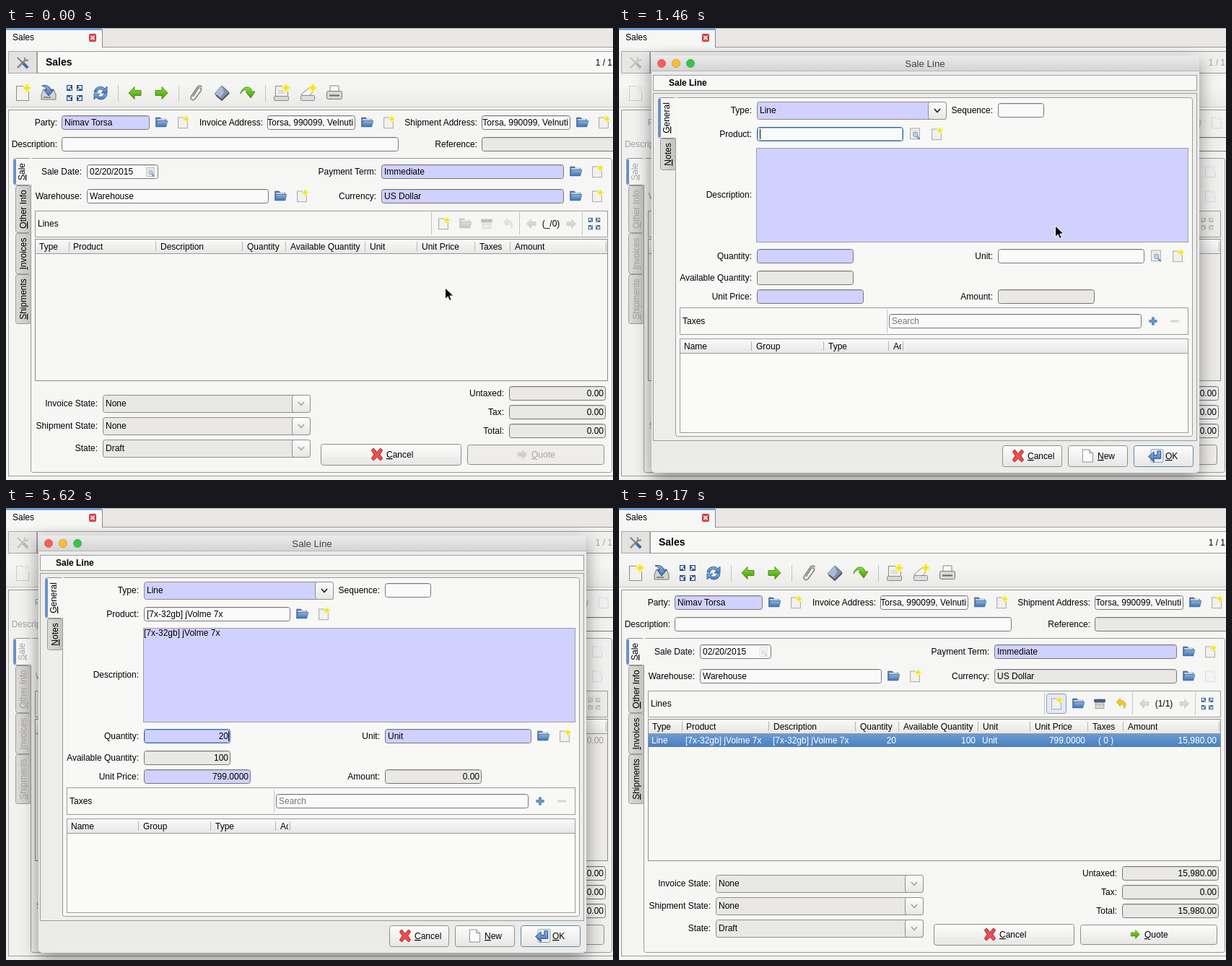
Write an HTML page that moves like this. It is 841 px wide and 626 px high and loops after 9.27 s.

```html
<!DOCTYPE html>
<html lang="en">
<head>
<meta charset="utf-8">
<title>Sales order entry</title>
<style>
html, body { margin: 0; width: 100%; height: 100%; overflow: hidden; background: #f5f5f4; }
svg { display: block; }
text { font-family: "Liberation Sans", Arial, Helvetica, sans-serif; white-space: pre; }
.u { text-decoration: underline; }
.off { filter: grayscale(1) opacity(.36); }
.shadow { filter: drop-shadow(0 9px 12px rgba(0,0,0,.42)); }
</style>
</head>
<body>
<svg id="stage" width="841" height="626" viewBox="0 0 841 626">
  <defs>
    <linearGradient id="btn" x2="0" y2="1"><stop stop-color="#fdfdfd"/><stop offset="1" stop-color="#e7e6e4"/></linearGradient>
    <linearGradient id="head" x2="0" y2="1"><stop stop-color="#fafafa"/><stop offset="1" stop-color="#e8e7e5"/></linearGradient>
    <linearGradient id="bar" x2="0" y2="1"><stop offset=".3" stop-color="#f5f5f4"/><stop offset="1" stop-color="#ebeae8"/></linearGradient>
    <linearGradient id="title" x2="0" y2="1"><stop stop-color="#ebebeb"/><stop offset="1" stop-color="#d3d3d3"/></linearGradient>
    <linearGradient id="tab"><stop stop-color="#dcdbd9"/><stop offset="1" stop-color="#c3c2c0"/></linearGradient>
    <linearGradient id="pick" x2="0" y2="1"><stop stop-color="#6a9bd3"/><stop offset="1" stop-color="#4a80c0"/></linearGradient>
    <linearGradient id="blue" x2="0" y2="1"><stop stop-color="#8db4e2"/><stop offset="1" stop-color="#3f73b0"/></linearGradient>
    <linearGradient id="green" x2="0" y2="1"><stop stop-color="#8ae234"/><stop offset="1" stop-color="#3f9a06"/></linearGradient>
  </defs>
  <g id="scene"></g>
</svg>
<script>
const LOOP = 9270;
const ITEM = '[7x-32gb] jVolme 7x';
const LILAC = '#d1d1ff', READ = '#e9e8e6', EDGE = '#777', LINE = '#9b9b99', FOCUS = '#3a6ea5';

// Each step changes some values and keeps the rest.
const STEPS = [
  [0, { x: 609, y: 361, cur: 'arrow', on: 1, dlg: 0, row: 0, hot: 0, total: 0, hover: 0, item: 0, focus: 'product', qty: '', locked: 0 }],
  [210, { x: 608, y: 341 }],
  [420, { x: 607, y: 304 }],
  [620, { x: 605, y: 280, hot: 1 }],
  [830, { y: 275 }],
  [1040, { hot: 2 }],
  [1250, { dlg: 1 }],
  [1460, { dlg: 2, on: 0, hot: 0 }],
  [1670, { x: 520, y: 215 }],
  [1870, { x: 436, y: 163 }],
  [2080, { x: 413, y: 150, hover: 1 }],
  [2290, { hover: 2 }],
  [2490, { hover: 1 }],
  [2700, { item: 1, row: 1, hover: 0 }],
  [2910, { x: 398, y: 172, cur: 'beam' }],
  [3120, { x: 350, y: 222 }],
  [3330, { x: 312, y: 256 }],
  [3530, { x: 302, y: 267 }],
  [3740, { x: 301, y: 282 }],
  [3950, { x: 300, y: 304 }],
  [4160, { x: 299, y: 315 }],
  [4370, { focus: 'qty' }],
  [4580, { x: 299, y: 317 }],
  [5210, { qty: '2', cur: '' }],
  [5420, { qty: '20' }],
  [6870, { dlg: 0, cur: 'arrow', x: 299, y: 315 }],
  [7290, { on: 1, row: 2, locked: 1, hot: 1 }],
  [7500, { total: 1 }],
  [7700, { x: 352, y: 328 }],
  [7910, { x: 448, y: 330 }],
  [8120, { x: 462, y: 322 }],
  [8540, { x: 618, y: 428 }],
  [8750, { x: 737, y: 552 }],
  [8960, { x: 815, y: 608 }],
  [9170, { cur: '' }]
];
const states = [];
STEPS.forEach(([, change], i) => states.push({ ...states[i - 1], ...change }));

const box = (x, y, w, h, fill, stroke = 'none', rx = 0) =>
  `<rect x="${x + .5}" y="${y + .5}" width="${w - 1}" height="${h - 1}" rx="${rx}" fill="${fill}" stroke="${stroke}"/>`;
const fillBox = (x, y, w, h, fill) => `<rect x="${x}" y="${y}" width="${w}" height="${h}" fill="${fill}"/>`;
const path = (d, fill = 'none', stroke = 'none', w = 1) =>
  `<path d="${d}" fill="${fill}" stroke="${stroke}" stroke-width="${w}"/>`;
const vline = (x, y1, y2, c = '#c4c4c2') => path(`M${x + .5} ${y1}V${y2}`, 'none', c);
const hline = (x1, x2, y, c = LINE) => path(`M${x1} ${y + .5}H${x2}`, 'none', c);
const dot = (x, y, r, fill, stroke = 'none') => `<circle cx="${x}" cy="${y}" r="${r}" fill="${fill}" stroke="${stroke}"/>`;

// A "~" underlines the letter that follows it.
function text(x, y, s, { a = 'start', c = '#000', z = 12, b = 0, r = 0 } = {}) {
  const body = s.replace(/~(.)/, '<tspan class="u">$1</tspan>');
  const turn = r ? ` transform="rotate(-90 ${x} ${y})"` : '';
  return `<text x="${x}" y="${y}" text-anchor="${a}" fill="${c}" font-size="${z}"${b ? ' font-weight="700"' : ''}${turn}>${body}</text>`;
}
const label = (x, y, s, c) => text(x, y, s, { a: 'end', c });

function field(x, y, w, fill, s = '', right = 0, edge = EDGE) {
  const clip = `<svg x="${x + 1}" y="${y}" width="${w - 2}" height="20">` +
    text(right ? w - 4 : 3, 14, s, { a: right ? 'end' : 'start' }) + '</svg>';
  return box(x, y, w, 20, fill, edge, 3) + hline(x + 3, x + w - 3, y + 1, 'rgba(0,0,0,.1)') + clip;
}

const page = `<rect x="-8.5" y="-9.5" width="17" height="20" fill="#f1f1ef" stroke="#8c8c88"/>`;
const star = dot(6, -7, 5.5, '#fbf6a0') + path('M6 -13l1.7 4.2 4.3 1.8-4.3 1.8-1.7 4.2-1.7-4.2-4.3-1.8 4.3-1.8z', '#f3e320');
const arrowR = 'M-8 -3.5H1V-8.5L9 0L1 8.5V3.5H-8Z';
const printer = path('M-6 -1V-10H6V-1', '#fafafa', '#888') +
  `<rect x="-10.5" y="-2.5" width="21" height="11" rx="2" fill="#d8d8d4" stroke="#777"/>` + path('M-7 3.5H7', 'none', '#666', 2);
const ICONS = {
  page,
  blank: path('M-7 -9H3L8 -4V9H-7Z', '#fbfbfb', '#8c8c88') + path('M3 -9V-4H8', '#ddd', '#8c8c88'),
  make: page + star,
  save: path('M-10 2L-7 -5H7L10 2V9H-10Z', '#d3d3cf', '#777') + path('M-7 6H3', 'none', '#888', 2) +
    path('M-9 -10C-2 -12 3 -8 3 -4H7L0 4L-6 -4H-3C-3 -7 -5 -9 -9 -10Z', 'url(#blue)', '#204a87'),
  full: [[-1, -1], [1, -1], [-1, 1], [1, 1]].map(([i, j]) =>
    `<g transform="scale(${i} ${j})">` + fillBox(3, 3, 8, 8, '#234f86') + path('M4 4L8.5 8.5M9 5V9H5', 'none', '#fff', 1.5) + '</g>').join(''),
  reload: path('M-9 -1C-8 -9 2 -11 6 -6L9 -9V0H1L4 -3C0 -7 -4 -5 -5 -1Z', 'url(#blue)', '#3465a4') +
    path('M9 1C8 10 -2 11 -6 6L-9 9V1H-1L-4 4C0 7 4 5 5 1Z', 'url(#blue)', '#3465a4'),
  next: path(arrowR, 'url(#green)', '#4a8f1a'),
  back: `<g transform="scale(-1 1)">${path(arrowR, 'url(#green)', '#4a8f1a')}</g>`,
  clip: path('M-4 5L3 -6C5 -9 9 -6 7 -3L-1 8C-4 12 -9 8 -6 4L2 -8C4 -11 8 -10 8 -8', 'none', '#858583', 1.6),
  action: path('M0 -10L10 -1L0 10L-10 1Z', '#7d93b5', '#4b5f80') + path('M-10 1L0 -10L3 -1L-2 6Z', '#adbcd3') + path('M-8 3L0 10L10 0', 'none', '#555', 2),
  jump: path('M-10 1C-8 -10 4 -11 6 -2H10L4 7L-3 -2H1C-1 -6 -7 -5 -10 1Z', 'url(#green)', '#4a8f1a'),
  report: page + star + path('M-5 -3H3M-5 0H4', 'none', '#bbb') + `<rect x="-10.5" y="4.5" width="20" height="6" rx="1" fill="#d8d8d4" stroke="#888"/>`,
  mail: path('M-10 2L3 -9L8 -4L-2 8Z', '#f4f4f2', '#888') + `<rect x="-10.5" y="3.5" width="19" height="7" rx="1" fill="#ddd" stroke="#888"/>` + star,
  print: printer,
  folder: path('M-10 9V-8H-2L0 -5H9V9Z', '#5b7ba3', '#46678f') + path('M-8 -4H8', 'none', '#eee', 2) + path('M-10 9L-7 -2H12L9 9Z', 'url(#blue)', '#4270a6'),
  find: page + path('M-6 -5H5M-6 -2H5', 'none', '#ccc') + dot(1, 2, 4.5, '#b9d3f0', '#5f86b3') + path('M4 6L9 11', 'none', '#777', 2.5),
  trash: path('M-10 -3V-8H10V-3Z', '#3f5f88', '#34506f') + path('M-8 -2H8V9H-8Z', '#d7d7d3', '#888') + path('M-8 2H8', 'none', '#aaa'),
  undo: path('M-9 -3L-2 -10V-6C8 -6 11 3 5 9C6 4 4 1 -2 1V5Z', '#f0c92b', '#c4a000'),
  tools: path('M-8 8L4 -4', 'none', '#8a8d88', 3) + path('M3 -8L4 -3L9 -4', 'none', '#8a8d88', 2.5) + path('M-8 -8L1 1', 'none', '#777', 2) + path('M1 1L8 8', 'none', '#3b6fb0', 4.5),
  cross: path('M-8 -6L-5 -9L0 -3L5 -9L8 -6L4 0L8 6L5 9L0 4L-5 9L-8 6L-4 0Z', '#e8504c', '#a81414'),
  enter: `<rect x="-7.5" y="-9.5" width="18" height="19" rx="2" fill="#eceff3" stroke="#8d9bb0"/>` +
    path('M7 -7V4H-3V9L-11 1L-3 -6V-1H2V-7Z', 'url(#blue)', '#204a87'),
  plus: path('M-2 -7H2V-2H7V2H2V7H-2V2H-7V-2H-2Z', '#6b98d0', '#4374ad'),
  minus: fillBox(-8, -2, 16, 4, '#9a9a98')
};
const icon = (name, x, y, k = 1, off = 0) =>
  `<g transform="translate(${x} ${y}) scale(${k})"${off ? ' class="off"' : ''}>${ICONS[name]}</g>`;
const SMALL = .74;
const small = (name, x, y, off) => icon(name, x, y, SMALL, off);
const pair = (x, y, off, first = 'folder') => small(first, x, y - 1, off) + small('make', x + 30, y, off);

function combo(x, y, w, s, fill, c, split) {
  const m = (split + x + w) / 2, h = y + 12;
  return box(x, y, w, 25, fill, '#8d8d8b', 3) + box(split, y, x + w - split, 25, 'url(#btn)', '#8d8d8b', 3) +
    text(x + 4, y + 16, s) + path(`M${m - 4} ${h - 2}L${m} ${h + 2.5}L${m + 4} ${h - 2}`, 'none', c, 1.7);
}
function button(x, y, w, h, s, tx, name, ix, off = 0, edge = '#8d8d8b') {
  return box(x, y, w, h, off ? '#eeedeb' : 'url(#btn)', edge, 3) + icon(name, ix, y + h / 2 - .5, name === 'next' ? .7 : .95, off) +
    text(tx, y + h / 2 + 4, s, { c: off ? '#a4a4a2' : '#000' });
}
function sideTab(x, y, w, h, s, c, active) {
  return box(x, y, w, h, active ? '#f6f6f5' : 'url(#tab)', active ? '#8f8f8d' : LINE, 3) +
    (active ? fillBox(x + 1, y + 2, 3, h - 4, '#5f93d2') + fillBox(x + w - 2, y + 1, 4, h - 2, '#f6f6f5') : '') +
    text(x + (active ? 16 : 15), y + h / 2, s, { a: 'middle', c, r: 1 });
}
function header(x, y, w, cols, seps, c) {
  return fillBox(x + 1, y + 1, w - 2, 19, 'url(#head)') + hline(x, x + w, y + 20) +
    cols.map(([cx, s]) => text(cx, y + 15, s, { c })).join('') +
    seps.map(sx => vline(sx, y + 4, y + 17, '#b5b5b3')).join('');
}

function mainWindow(s) {
  const off = !s.on, c = off ? '#a2a2a0' : '#000';
  const bg = off ? '#f1f1f0' : '#f5f5f4';
  const plain = off ? '#f0f0ef' : '#fafafa', lilac = off ? plain : LILAC, read = off ? plain : READ;
  const sum = s.total ? '15,980.00' : '0.00';
  let o = fillBox(0, 0, 841, 626, bg) + fillBox(0, 0, 841, 27, '#e9e8e7') + hline(0, 841, 0, '#aaa') + hline(133, 841, 26);

  o += fillBox(0, 0, 134, 27, '#f6f6f5') + fillBox(0, 0, 133, 3, '#6c9cd8') + vline(133, 1, 27, '#888') + text(9, 17, 'Sales') +
    box(115, 8, 10, 11, '#d9514e', '#b33', 1) + path('M117.5 11L122.5 16M122.5 11L117.5 16', 'none', '#fff', 1.6);

  o += box(3, 32, 40, 31, off ? '#e8e7e5' : '#e3e2e0', '#a9a9a7') + icon('tools', 23, 48, .9, off) +
    box(43, 32, 802, 31, off ? '#efefee' : '#f8f8f7', '#999') + text(55, 52, 'Sales', { z: 14, b: 1, c }) + label(840, 52, '1 / 1', c);

  o += fillBox(0, 67, 841, 42, 'url(#bar)') + hline(0, 841, 109, '#c9c9c7');
  [['make', 23], ['save', 59], ['full', 95], ['reload', 131], ['back', 179], ['next', 215], ['clip', 263],
    ['action', 299], ['jump', 335], ['report', 382], ['mail', 419], ['print', 455]].forEach(([n, x]) => o += icon(n, x, 90, 1, off));
  [155, 239, 359].forEach(x => o += vline(x, 79, 102));

  o += box(3, 113, 845, 508, 'none', LINE);
  const address = 'Nimav Torsa, 990099, Velnuti';
  o += label(71, 135, 'Party:', c) + field(77, 121, 122, lilac, 'Nimav Torsa') + pair(215, 131, off) +
    label(356, 135, 'Invoice Address:', c) + field(362, 121, 122, plain, address, 1) + pair(500, 131, off) +
    label(653, 135, 'Shipment Address:', c) + field(659, 121, 123, plain, address, 1) + pair(798, 131, off) +
    label(71, 165, 'Description:', c) + field(77, 151, 467, plain) +
    label(653, 165, 'Reference:', c) + field(659, 151, 190, read);

  o += box(34, 180, 806, 436, off ? '#f0f0ef' : '#f6f6f5', LINE, 3) +
    sideTab(13, 218, 22, 66, '~Other Info', c) + sideTab(13, 284, 22, 57, '~Invoices', c) +
    sideTab(13, 341, 22, 69, '~Shipments', c) + sideTab(10, 180, 25, 38, '~Sale', c, 1);

  o += label(105, 203, 'Sale Date:', c) + field(112, 189, 99, plain, '02/20/2015') + icon('find', 200, 199, .6, off || s.locked) +
    label(513, 203, 'Payment Term:', c) + field(520, 189, 253, lilac, 'Immediate') + pair(789, 199, off) +
    label(105, 237, 'Warehouse:', c) + field(112, 223, 252, plain, 'Warehouse') + pair(380, 233, off) +
    label(513, 237, 'Currency:', c) + field(520, 223, 253, s.locked ? READ : lilac, 'US Dollar') +
    small('folder', 789, 232, off) + small('make', 819, 233, off || s.locked);

  o += box(40, 253, 794, 37, off ? '#ecebea' : '#f6f6f5', LINE) + text(44, 275, 'Lines', { c });
  if (s.hot) o += box(592, 257, 28, 28, s.hot > 1 ? '#c9d5e6' : '#e3eaf4', '#7d9cc6', 3);
  const bare = off || s.row < 2;
  o += small('make', 606, 271, off) + small('folder', 636, 270, bare) + small('trash', 666, 271, bare) + small('undo', 696, 271, bare) +
    small('back', 728, 271, 1) + text(755, 275, s.row ? '(1/1)' : '(_/0)', { a: 'middle', c }) + small('next', 783, 271, 1) + small('full', 815, 271, off);
  [589, 711, 798].forEach(x => o += vline(x, 255, 286));

  o += box(40, 292, 794, 197, off ? '#ecebe9' : '#f7f7f6', '#8d8d8b') + header(40, 292, 794,
    [[46, 'Type'], [93, 'Product'], [214, 'Description'], [334, 'Quantity'], [394, 'Available Quantity'], [504, 'Unit'],
      [576, 'Unit Price'], [656, 'Taxes'], [705, 'Amount']], [87, 207, 327, 387, 497, 569, 649, 698, 831], c);
  if (s.row) {
    const done = s.row > 1, ink = done ? '#fff' : c;
    if (done) o += fillBox(41, 313, 792, 18, 'url(#pick)');
    [[45, 'Line'], [92, ITEM], [213, ITEM], [503, 'Unit'], [664, '( 0 )']].forEach(([x, v]) => o += text(x, 326, v, { c: ink }));
    [[384, done ? '20' : ''], [494, '100'], [646, '799.0000'], [828, done ? '15,980.00' : '0.00']].forEach(([x, v]) => o += label(x, 326, v, ink));
  }

  [['Invoice State:', 'None'], ['Shipment State:', 'None'], ['State:', 'Draft']].forEach(([l, v], i) =>
    o += label(127, 524 + 31 * i, l, c) + combo(134, 508 + 31 * i, 288, v, read, '#a5a5a3', 396));
  [['Untaxed:', sum], ['Tax:', '0.00'], ['Total:', sum]].forEach(([l, v], i) =>
    o += label(690, 510 + 26 * i, l, c) + field(697, 496 + 26 * i, 134, read, v, 1));
  return o + button(436, 576, 195, 30, '~Cancel', 527, 'cross', 514, off) +
    button(639, 577, 190, 28, '~Quote', 728, 'next', 715, !s.total || off);
}

function dialog(s) {
  const live = s.dlg > 1, tint = ['#fc5b57', '#fdbc2e', '#33c748'];
  let o = `<rect class="shadow" x="45" y="38" width="759" height="578" rx="5" fill="#ebebea"/>` +
    path('M45 60V43Q45 38 50 38H799Q804 38 804 43V60Z', live ? 'url(#title)' : '#f6f6f6') + hline(45, 804, 59, live ? '#b4b4b4' : '#d8d8d8');
  tint.forEach((t, i) => o += dot(59 + 20 * i, 49, 5.7, live ? t : '#d3d3d3', live ? 'rgba(0,0,0,.18)' : '#c2c2c2'));
  o += text(424, 54, 'Sale Line', { a: 'middle', z: 13.3, c: live ? '#444' : '#b2b2b2' });
  if (!live) return o;

  const plain = '#fafafa', inProduct = s.focus === 'product', got = s.item;
  const narrow = got ? 120 : 134;
  o += box(47, 65, 754, 22, '#f8f8f7', LINE) + text(69, 80, 'Sale Line', { b: 1 }) + box(47, 90, 754, 482, '#ededeb', LINE) +
    box(78, 96, 717, 470, '#f8f8f7', LINE, 3) + sideTab(57, 153, 22, 44, '~Notes', '#000') + sideTab(54, 96, 25, 57, '~General', '#000', 1);

  o += label(184, 118, 'Type:') + combo(191, 102, 263, 'Line', LILAC, '#222', 428) +
    label(518, 118, 'Sequence:') + field(525, 104, 64, plain) +
    label(184, 151, 'Product:') + field(191, 137, 203, plain, got ? ITEM : '', 0, inProduct ? FOCUS : EDGE);
  if (inProduct) o += box(192, 138, 201, 18, 'none', '#8fb3dd', 2) + vline(got ? 302 : 195, 140, 154, '#000');
  if (s.hover) o += box(396, 133, 28, 28, s.hover > 1 ? '#d5d4d2' : 'url(#btn)', '#8d8d8b', 3);
  o += pair(410, 147, 0, got ? 'folder' : 'find');

  o += label(184, 235, 'Description:') + box(190, 166, 599, 131, LILAC, '#a0a0a0') + text(191, 177, got ? ITEM : '');

  o += label(184, 320, 'Quantity:') + field(191, 306, narrow, LILAC, s.qty, 1, inProduct ? EDGE : FOCUS);
  if (!inProduct) o += box(192, 307, narrow - 2, 18, 'none', '#8fb3dd', 2) + vline(308, 309, 323, '#000');
  o += label(518, 320, 'Unit:') + field(525, 306, 203, got ? LILAC : plain, got ? 'Unit' : '') + pair(744, 316, 0, got ? 'folder' : 'find') +
    label(184, 350, 'Available Quantity:') + field(191, 336, narrow, READ, got ? '100' : '', 1) +
    label(184, 376, 'Unit Price:') + field(191, 362, 148, LILAC, got ? '799.0000' : '', 1) +
    label(518, 376, 'Amount:') + field(525, 362, 134, READ, got ? '0.00' : '', 1);

  o += box(84, 387, 705, 38, '#f8f8f7', LINE) + text(88, 410, 'Taxes') + vline(371, 390, 422) + field(374, 396, 350, plain) +
    text(378, 410, 'Search', { c: '#777' }) + small('plus', 740, 406) + small('minus', 770, 406, 1) +
    box(84, 430, 705, 131, '#fafaf9', LINE) +
    header(84, 430, 705, [[90, 'Name'], [190, 'Group'], [290, 'Type']], [183, 283, 373, 393], '#000') +
    `<svg x="380" y="432" width="11" height="17">${text(0, 13, 'Ac')}</svg>`;

  return o + button(531, 578, 83, 30, '~Cancel', 566, 'cross', 553) + button(622, 578, 83, 30, '~New', 663, 'blank', 649) +
    button(713, 578, 83, 30, '~OK', 757, 'enter', 744, 0, '#5f86b8');
}

function pointer({ cur, x, y }) {
  if (!cur) return '';
  const shape = cur === 'arrow'
    ? path('M-.5 -1V14.5L3.2 11L5.6 16.5L8.2 15.4L5.8 10H11Z', '#000', '#fff')
    : path('M-3 -7.5Q0 -7.5 0 -5V5Q0 7.5 -3 7.5M3 -7.5Q0 -7.5 0 -5M0 5Q0 7.5 3 7.5M-2 2.5H2', 'none', '#111', 1.1);
  return `<g transform="translate(${x} ${y})">${shape}</g>`;
}

const scene = document.getElementById('scene');
let shown = -1;
function frame(now) {
  const t = now % LOOP;
  const i = STEPS.findLastIndex(([at]) => at <= t);
  if (i !== shown) {
    const s = states[i];
    scene.innerHTML = mainWindow(s) + (s.dlg ? dialog(s) : '') + pointer(s);
    shown = i;
  }
}
const start = performance.now();
function tick() {
  frame(performance.now() - start);
  requestAnimationFrame(tick);
}
tick();
</script>
</body>
</html>
```
